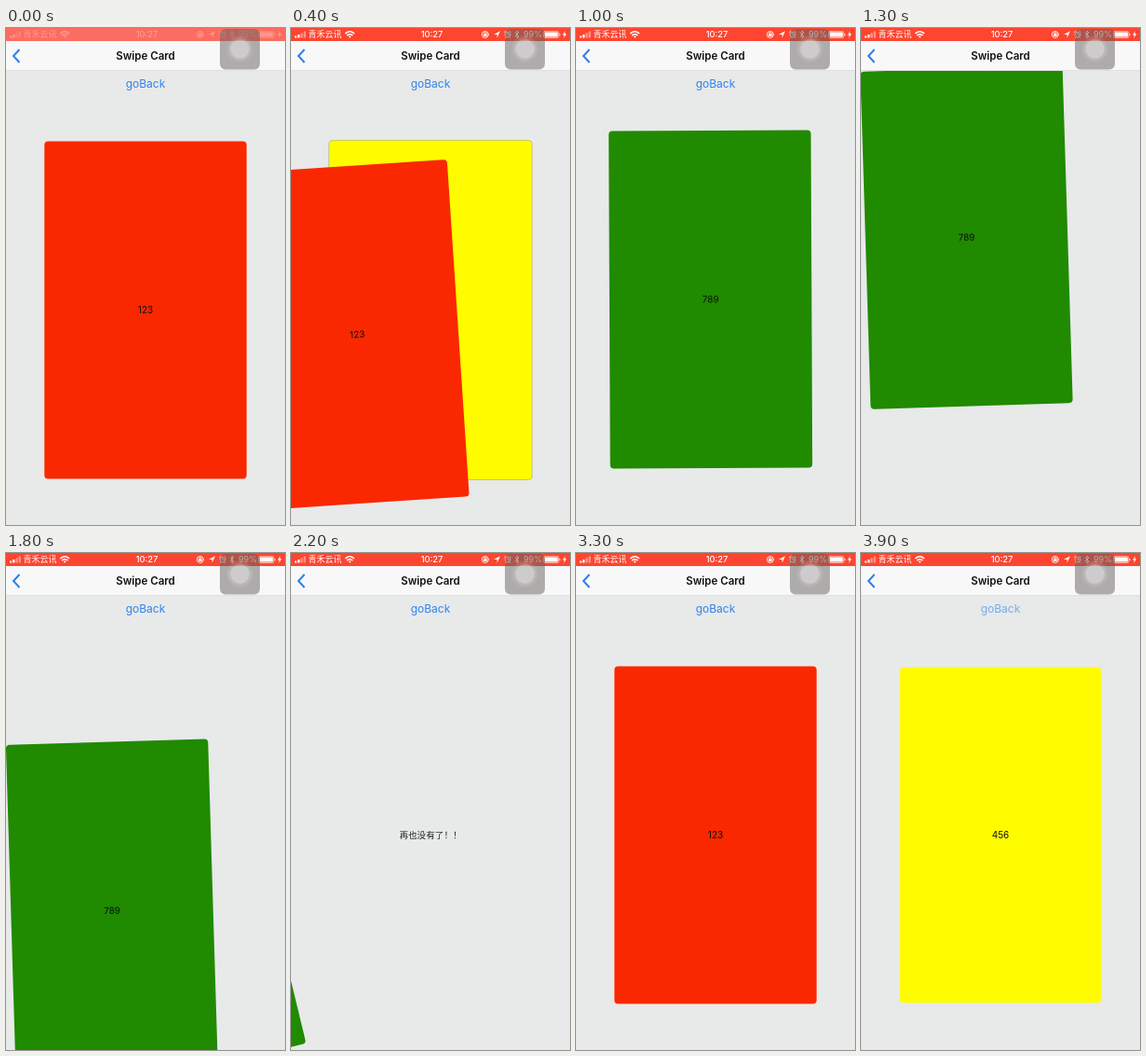
Animation of 300x533 px, one loop 5.4 s. Source, as an HTML page:

```html
<!DOCTYPE html>
<html lang="zh-CN">
<head>
<meta charset="utf-8">
<title>Swipe Card</title>
<style>
  html, body { margin: 0; width: 100%; height: 100%; overflow: hidden; background: #e8e9e9; }
  svg { display: block; width: 100%; height: 100%; }
  text { font-family: Inter, "Noto Sans CJK SC", "Noto Sans CJK", sans-serif; }
  .mid { text-anchor: middle; }
  .card text { font-size: 10px; fill: #111; text-anchor: middle; }
  .card.under rect { stroke: #000; stroke-opacity: .3; stroke-width: .6; }
  .line { fill: none; stroke: #fff; stroke-linecap: round; stroke-linejoin: round; }
</style>
</head>
<body>
<svg viewBox="0 0 300 533" preserveAspectRatio="none">
  <rect width="300" height="533" fill="#e8e9e9"/>
  <text id="back" class="mid" x="150" y="64" font-size="12" fill="#2e84ec">goBack</text>
  <text id="empty" class="mid" x="150" y="306" font-size="9.6" fill="#222">再也没有了！！</text>
  <g id="deck"></g>

  <g id="header">
    <rect y="14" width="300" height="32" fill="#f8f8f9"/>
    <rect y="45.5" width="300" height=".5" fill="#c8c8c8"/>
    <path d="M14.5 23 L8 30 L14.5 37" fill="none" stroke="#2f80e8" stroke-width="2"/>
    <text class="mid" x="150" y="34" font-size="11.5" font-weight="600" fill="#111">Swipe Card</text>
  </g>

  <rect id="bar" width="300" height="14"/>
  <g id="status" fill="#fff">
    <path d="M4 8.5h2.2v2H4z M7.2 7h2.2v3.5H7.2z"/>
    <path d="M10.4 5.2h2.2v5.3h-2.2z M13.6 3.4h2.2v7.1h-2.2z" opacity=".45"/>
    <text x="18.5" y="10.3" font-size="9">青禾云讯</text>
    <path class="line" stroke-width="1.5" d="M58.8 5.6 Q63.2 2 67.6 5.6 M60.6 7.7 Q63.2 5.6 65.8 7.7"/>
    <path d="M61.7 9 Q63.2 7.9 64.7 9 L63.2 10.8z"/>
    <text class="mid" x="151.5" y="10.3" font-size="9.3" font-weight="500">10:27</text>
    <g class="line" stroke-width=".9">
      <circle cx="208.8" cy="7" r="3.5"/>
      <path d="M207.8 6.6V5.7a1 1 0 0 1 2 0v.9"/>
      <circle cx="233" cy="7.2" r="2.8"/>
      <path d="M233 5.8V7.4H234.2 M229.6 4.6L231 3.4 M236.4 4.6L235 3.4 M231 10L230.3 10.8 M235 10L235.7 10.8"/>
      <path d="M241 5L245 9L243 11V3L245 5L241 9"/>
    </g>
    <path d="M207 6.5h3.6v2.4H207z"/>
    <path d="M225 3.3L221.6 10.6V7H218z"/>
    <text x="250" y="10.3" font-size="9">99%</text>
    <rect x="271.5" y="3.7" width="16.4" height="6.8" rx="1.4" fill="none" stroke="#fff" stroke-width=".6"/>
    <rect x="272.5" y="4.6" width="14.4" height="5" rx=".6"/>
    <path d="M288.5 6h.9v2.2h-.9z M295 3L292 7.5H294L293.2 11L296.3 6.3H294.3z"/>
  </g>

  <g id="touch">
    <rect x="230" y="1" width="43" height="43.5" rx="6" fill="#66605e" opacity=".5"/>
    <g fill="#fff">
      <circle cx="251.5" cy="22.5" r="14.5" opacity=".07"/>
      <circle cx="251.5" cy="22.5" r="12.5" opacity=".1"/>
      <circle cx="251.5" cy="22.5" r="10.3" opacity=".28"/>
    </g>
  </g>
</svg>
<script>
const LOOP = 5400, STEP = 100, TILT = 0.0483;
const $ = id => document.getElementById(id);

const deck = [["123", "#fa2800"], ["456", "#fffc00"], ["789", "#208a00"]];
$("deck").innerHTML = deck.map(([label, color]) => `
  <g class="card">
    <rect x="-108.7" y="-181" width="217.4" height="362" rx="4" fill="${color}"/>
    <text y="3.5">${label}</text>
  </g>`).reverse().join("");
const cards = [...$("deck").children].reverse();

// Key points are [step, x, y], with x and y measured from the resting place
const swipe = (card, ...keys) => ({ card, keys: [...keys], rest: card + 1, back: false });
const goBack = (card, step, end, x, y) =>
  ({ card, keys: [[step, x, y], [end, 0, 0]], rest: card, back: true });

const moves = [
  swipe(0, [3, 0, 0], [6, -315, 105]),
  swipe(1, [6, 0, 0], [7, 170.5, -36.5], [9, 342, -60]),
  swipe(2, [9, 0, 0], [13, -36.5, -78], [18, -36, 81], [21, -125, -8], [22, -282, 73], [23, -440, 150]),
  goBack(2, 24, 26, -240, 82),
  goBack(1, 27, 29, 300, -40),
  goBack(0, 30, 33, -300, 90),
  goBack(0, 34, 36, -1000, 0),
  goBack(0, 38, Infinity, -1000, 0)   // still out of sight when the loop ends
];

function follow(keys, n) {
  const i = keys.findIndex(k => k[0] > n);
  const [t0, x0, y0] = keys[i - 1], [t1, x1, y1] = keys[i];
  const p = (1 - Math.cos(Math.PI * (n - t0) / (t1 - t0))) / 2;
  return [x0 + (x1 - x0) * p, y0 + (y1 - y0) * p];
}

function place(card, x = 0, y = 0, scale = 1) {
  card.setAttribute("display", "inline");
  card.setAttribute("transform",
    `translate(${150 + x} ${302.5 + y}) rotate(${x * TILT}) scale(${scale})`);
}

function draw(time) {
  const n = Math.floor((time % LOOP) / STEP);
  const move = moves.filter(m => m.keys[0][0] < n).pop();
  const active = move && n < move.keys.at(-1)[0];
  const top = !move ? 0 : active ? move.card + 1 : move.rest;

  cards.forEach((card, i) => {
    card.setAttribute("display", "none");
    card.classList.toggle("under", active && !move.back && i === top);
  });
  if (cards[top]) place(cards[top], 0, 0, !active ? 1 : move.back ? .994 : 1.005);
  if (active) place(cards[move.card], ...follow(move.keys, n));
  $("empty").setAttribute("display", cards[top] ? "none" : "inline");

  $("back").setAttribute("opacity", active && move.back ? .62 : 1);
  $("bar").setAttribute("fill", n ? "#fd4530" : "#fc6c60");
  $("status").setAttribute("opacity", n ? 1 : .3);
}

const began = performance.now();
function tick() {
  draw(performance.now() - began);
  requestAnimationFrame(tick);
}
tick();
</script>
</body>
</html>
```
